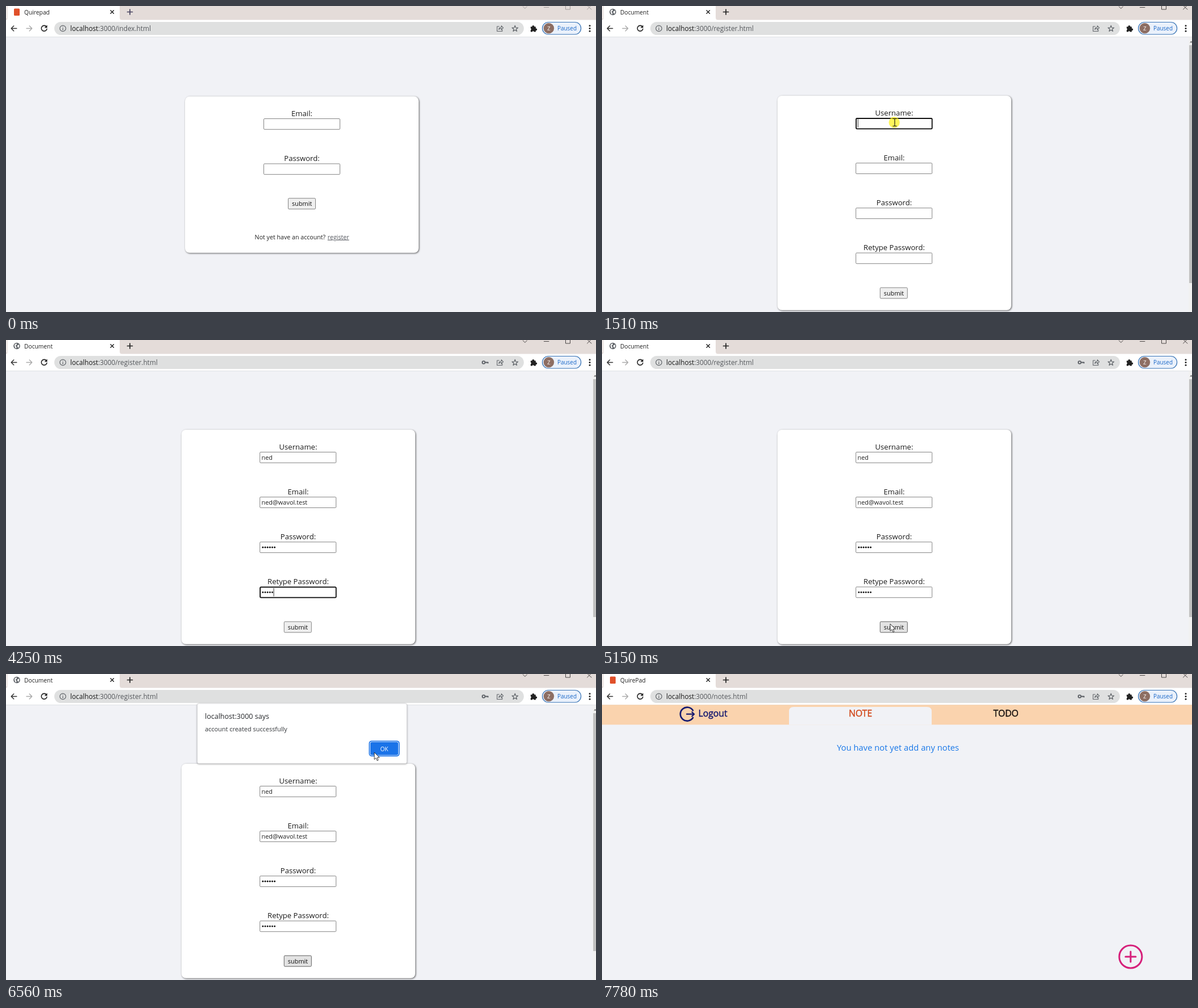
An HTML page that plays this animation: 1038 px wide and 539 px high, repeating every 8.18 s.

```html
<!DOCTYPE html>
<html lang="en">
<head>
<meta charset="utf-8">
<title>Sign up</title>
<style>
html, body { margin: 0; width: 100%; height: 100%; overflow: hidden; background: #f1f2f6; }
svg { display: block; width: 1038px; height: 539px; }
text { font-family: "Open Sans", "Noto Sans", sans-serif; }
.card { fill: #fff; filter: drop-shadow(1.6px 1.6px 1.5px rgba(0, 0, 0, .62)); }
.dialog { fill: #fff; stroke: #c9cacd; stroke-width: .6; filter: drop-shadow(0 1px 1.5px rgba(0, 0, 0, .35)); }
.box { fill: #fff; stroke: #767676; stroke-width: .9; }
.line { fill: none; stroke-linecap: round; stroke-linejoin: round; }
</style>
</head>
<body>
<svg id="stage" viewBox="0 0 1038 539"></svg>
<script>
const LOOP = 8180;
const INK = '#222', NAVY = '#151a70', PINK = '#d6207a';

// Runs of picture changes: first time, last time, number of steps.
const RUNS = [
  [100, 900, 9], [1000, 1310, 4], [1510, 1710, 3], [2010, 2010, 1], [2310, 2310, 1],
  [2510, 2510, 1], [2930, 3430, 6], [3740, 3830, 2], [4050, 4050, 1], [4250, 4350, 2],
  [4550, 5150, 7], [5350, 5550, 3], [5760, 6560, 9], [6660, 7380, 8], [7480, 7780, 4]
];

// Pointer path: time, x, y, shape from that time on.
const PATH = [
  [0, 0, 0, ''], [100, 915, 508, 'arrow'], [400, 712, 446, 'arrow'], [700, 588, 409, 'hand'],
  [900, 585, 407, 'hand'], [1000, 571, 362, 'arrow'], [1310, 515, 205, 'beam'],
  [2930, 536.5, 447, 'beam'], [3830, 536.5, 447, ''], [4350, 536.5, 447, 'beam'],
  [4550, 535, 450, 'beam'], [4650, 527, 462, 'arrow'], [4950, 507, 500, 'arrow'],
  [5560, 507, 500, 'arrow'], [5960, 509, 466, 'arrow'], [6360, 652, 134, 'arrow'],
  [6560, 648, 138, 'arrow'], [6660, 631, 151, 'arrow'], [6960, 664, 215, 'arrow'],
  [7180, 737, 343, 'arrow'], [7280, 790, 388, 'arrow'], [7380, 859, 431, 'arrow'],
  [7680, 976, 525, 'arrow'], [7780, 976, 525, '']
];
const STILL = [1310, 5560];          // the pointer rests until the next key
const CLICKS = [[900, 1000], [1510, 1710], [2930, 3030], [4950, 5150]];
const DOTS = [3230, 3430, 3740, 4050, 4250, 4350];

const text = (x, y, size, str, fill = INK, more = '') =>
  `<text x="${x}" y="${y}" font-size="${size}" fill="${fill}" ${more}>${str}</text>`;
const mid = 'text-anchor="middle"';
const label = (x, y, str) => text(x, y, 13.12, str, '#1c1c1c', mid);
const line = (d, color, width = 1.5, more = '') =>
  `<path class="line" d="${d}" stroke="${color}" stroke-width="${width}" ${more}/>`;
const rect = (x, y, w, h, fill, r = 0, more = '') =>
  `<rect x="${x}" y="${y}" width="${w}" height="${h}" rx="${r}" fill="${fill}" ${more}/>`;
const field = (x, y) => rect(x + .5, y + .5, 134, 18.8, '#fff', 1.4, 'class="box"');
const button = (x, y, id) =>
  rect(x + .5, y + .5, 48, 19, '#efefef', 1.6, `id="${id}" stroke="#767676" stroke-width=".9"`) +
  text(x + 24.7, y + 14.1, 10.93, 'submit', '#111', mid);
const group = (id, body) => `<g id="${id}">${body}</g>`;
const bullets = (id, y) => group(id, [0, 1, 2, 3, 4, 5].map(i =>
  `<circle cx="${451.9 + 4.15 * i}" cy="${y}" r="1.45" fill="#111"/>`).join(''));

const star = Array.from({ length: 10 }, (_, i) => {
  const r = i % 2 ? 2.3 : 5.6, a = i * Math.PI / 5 - Math.PI / 2;
  return `${895.5 + r * Math.cos(a)},${40 + r * Math.sin(a)}`;
}).join(' ');

const tabs =
  rect(0, 0, 1038, 25, '#e4dcd9') + rect(0, 0, 2.4, 22, '#f4efed') +
  '<path d="M0 25Q3 24 3 20V0H200V20Q200 24.5 204 25Z" fill="#fff"/>' +
  group('square', rect(14, 4.5, 10, 12.5, '#e0502a', 1.5)) +
  group('globe', '<circle cx="19" cy="10.5" r="5.8" fill="#5f6368"/>' +
    '<path d="M15 8.500q2.500-2.800 4.200-2l-.8 2.500-2 1 2 2-.4 3q-3-1.200-3-6.500M20 9.500l3-1.500q1 3-1 6l-2-2Z" fill="#fff"/>') +
  text(32, 14.6, 10.25, '', INK, 'id="title"') +
  line('M183.900 7.700l5.600 5.600m0-5.600l-5.600 5.600', '#222', 1.4) +
  group('add', line('M213.500 10.500h9m-4.500-4.500v9', 'currentColor', 1.7)) +
  group('caption', line('M909.500 1l3.500 3.500 3.500-3.500M946.500 2.500h8.500M984.500-1V6H992.500V-1M1022.500 6L1026 2.500l4 3.500M1022.500-1l3.500 3.500 4-4', 'currentColor', 1));

const bar =
  rect(0, 24.5, 1038, 29.700, '#fff') + rect(0, 54, 1038, .8, '#dadce0') +
  line('M18.800 39.500H9.500M13.700 35l-4.500 4.500 4.500 4.500', '#333', 1.5) +
  line('M36 39.500h9.300M41.200 35l4.500 4.500-4.500 4.500', '#aaa', 1.4) +
  line('M71 36.300A4.900 4.900 0 1 0 71.900 40.500', '#222', 1.600) +
  '<path d="M72.500 33.500v5h-5Z" fill="#222"/>' +
  rect(85, 28, 826, 23, '#dfe0e0', 11.5) +
  '<circle cx="100" cy="39.5" r="5.200" fill="none" stroke="#5f6368" stroke-width="1.200"/>' +
  line('M100 39.300v2.800M100 37v.1', '#5f6368', 1.3) +
  text(113, 43.7, 11.75, 'localhost<tspan fill="#55585c">:3000/<tspan id="page"></tspan></tspan>', '#161616') +
  group('key', '<circle cx="840.300" cy="39.500" r="2.400" fill="none" stroke="#5f6368" stroke-width="1.800"/>' +
    line('M843 39.500h5v1.800m-2-1.600v1', '#5f6368', 1.8, 'style="stroke-linecap:butt"')) +
  line('M867.500 36h-3.500v8.500h9V42M867 41.500q.5-4 4.500-4.200v-2.500l3.300 3.500-3.300 3.500v-2.300q-3-.2-4.500 2Z', '#5f6368', 1.1) +
  `<polygon points="${star}" fill="none" stroke="#5f6368" stroke-width="1.200" stroke-linejoin="round"/>` +
  '<path d="M923 36.500h2.700a1.900 1.900 0 1 1 3.700 0h2.600v3a1.900 1.900 0 1 1 0 3.700v2.300h-3a1.700 1.700 0 0 0-3.200 0H923v-3a1.800 1.800 0 0 0 0-3.300Z" fill="#222"/>' +
  rect(943.6, 28.500, 68, 21.500, '#eaf1fb', 10.800, 'stroke="#3672b5" stroke-width="1.200"') +
  '<circle cx="955" cy="39.300" r="9.200" fill="#8d6e63"/>' +
  text(955, 42.9, 9.6, 'Z', '#fff', mid) + text(970, 43.2, 9.95, 'Paused', '#1967c8') +
  [34.700, 39.500, 44.300].map(y => `<circle cx="1027" cy="${y}" r="1.500" fill="#222"/>`).join('');

const login =
  rect(315, 159.300, 411, 275.5, '#fff', 8, 'class="card"') +
  label(520.5, 194.2, 'Email:') + field(453, 198) +
  label(520.5, 273.4, 'Password:') + field(453, 277.4) +
  button(496, 338.2, 'enter') +
  text(437.6, 410.7, 10.66, 'Not yet have an account?') +
  text(565.800, 410.7, 10.66, 'register', '#55585f', 'text-decoration="underline"');

const names = ['Username:', 'Email:', 'Password:', 'Retype Password:'];
const register =
  rect(308.700, 158, 411.300, 377.800, '#fff', 8, 'class="card"') +
  names.map((n, i) => label(514, 192.800 + 79.200 * i, n) + field(446.2, 197 + 79.15 * i)).join('') +
  button(488.8, 495.6, 'send') +
  rect(447.2, 0, 133.5, 18.300, 'none', 1.6, 'id="ring" stroke="#101010" stroke-width="1.800"') +
  text(449.5, 210.7, 10.93, '', INK, 'id="user"') +
  group('filled', text(449.5, 289.900, 10.93, 'ned@wavol.test') + bullets('pass', 365.2)) +
  bullets('again', 444.4) +
  rect(0, 0, .9, 14.5, '#222', 0, 'id="caret"') +
  rect(1032, 54.800, 6, 485, '#f1f1f1') + rect(1033, 69, 5, 419, '#c1c1c1') +
  '<path d="M1034 64.500l2.500-3 2.500 3Z" fill="#777"/>';

const bold = (color, more = '') => `stroke="${color}" stroke-width=".45" ${more}`;
const notes =
  rect(0, 54.3, 1038, 35, '#fad3ae') +
  '<path d="M329 89.500V66q0-8 8-8H572q8 0 8 8V89.500Z" fill="#f1f2f6"/>' +
  line('M160 64.200A12 12 0 1 0 160 77', NAVY, 2.7) +
  line('M149 70.700h13M158.300 67l3.900 3.700-3.900 3.700', NAVY, 2.2) +
  text(169.500, 75.3, 15.74, 'Logout', NAVY, bold(NAVY)) +
  text(454.7, 75.3, 15.74, 'NOTE', '#d1491c', bold('#d1491c', mid)) +
  text(710.700, 75.3, 15.74, 'TODO', '#15100f', bold('#15100f', mid)) +
  text(520.700, 135, 14.76, 'You have not yet add any notes', '#1877e8', mid + ' id="empty"') +
  `<circle cx="930" cy="498" r="20" fill="none" stroke="${PINK}" stroke-width="3"/>` +
  line('M921 498h18M930 489v18', PINK, 3);

const dialog =
  rect(336.500, 52, 368.700, 105.700, '#fff', 3, 'class="dialog"') +
  text(350, 78.7, 12.54, 'localhost:3000 says', '#26282b') +
  text(350, 101, 10.94, 'account created successfully', '#33363a') +
  group('focus', rect(639.3, 118.3, 52.4, 26, '#fff', 4, 'stroke="#1a73e8" stroke-width="1.700"')) +
  rect(641, 120, 49, 22.700, '#1a73e8', 2.5, 'id="ok"') +
  text(665.5, 135.7, 10.1, 'OK', '#fff', mid);

const pointer =
  '<circle id="glow" r="9.700" cx="-.8" fill="#fdf21c" opacity=".72"/>' +
  group('arrow', '<path d="M0 0V12.500L2.900 9.900 5 14.600 7 13.700 5 9.200H9Z" fill="#fff" stroke="#222" stroke-width=".9" stroke-linejoin="round"/>') +
  group('beam', line('M-3.200-6.500h2.400q.8 0 .8 1 0-1 .8-1h2.400M0-5.500V5.500M-3.200 6.500h2.400q.8 0 .8-1 0 1 .8 1h2.400', '#111', 1.1)) +
  group('hand', '<path d="M-1 1Q0-1 1.200 1V6l4 .8q3 .6 3 3L7 15H1L-4 9q0-2 3 0Z" fill="#fff" stroke="#222" stroke-width=".9" stroke-linejoin="round"/>');

document.getElementById('stage').innerHTML =
  rect(0, 0, 1038, 539, '#f1f2f6') + tabs + bar +
  group('login', login) + group('register', register) + group('notes', notes) +
  group('dialog', dialog) + group('pointer', pointer);

const $ = id => document.getElementById(id);
const show = (id, on) => { $(id).style.display = on ? '' : 'none'; };
const set = (id, attrs) => { for (const k in attrs) $(id).setAttribute(k, attrs[k]); };
const within = (t, a, b) => t >= a && t < b;

function snap(t) {
  let last = 0;
  for (const [a, b, n] of RUNS) {
    if (t < a) break;
    const step = n > 1 ? (b - a) / (n - 1) : 1;
    last = a + Math.min(n - 1, Math.floor((t - a + 3) / step)) * step;
  }
  return last;
}

function pointerAt(t) {
  let i = PATH.length - 1;
  while (PATH[i][0] > t + 5) i--;
  const [a, x, y, kind] = PATH[i], next = PATH[i + 1];
  if (!next || STILL.includes(a)) return { x, y, kind };
  const k = Math.max(0, (t - a) / (next[0] - a));
  return { x: x + (next[1] - x) * k, y: y + (next[2] - y) * k, kind };
}

function drawForm(t) {
  const typed = DOTS.filter(d => t >= d - 5).length;
  const first = t < 2925, focused = within(t, 1505, 5045);
  $('user').textContent = 'ned'.slice(0, t < 2305 ? 0 : t < 2505 ? 2 : 3);
  show('filled', !first);
  [...$('again').children].forEach((dot, i) => { dot.style.display = i < typed ? '' : 'none'; });
  show('ring', focused);
  show('caret', focused && !within(t, 2005, 2305));
  set('ring', { y: first ? 198 : 435.4 });
  const x = first ? 449.900 + (t < 2305 ? 0 : t < 2505 ? 13 : 19.7) : 449.900 + 4.15 * typed;
  set('caret', { x, y: first ? 199.3 : 437 });
  set('send', { fill: t >= 4845 ? '#e3e3e3' : '#efefef', stroke: t >= 4845 ? '#4f4f4f' : '#767676' });
}

function drawDialog(t) {
  const leaving = t >= 6655;
  const alpha = t < 5345 ? 0 : t < 5445 ? .35 : t < 5545 ? .8 : !leaving ? 1 : t < 6755 ? .5 : t < 6855 ? .12 : 0;
  const lift = leaving ? (t < 6755 ? -9.6 : -13) : t < 5445 ? -3 : t < 5545 ? -1 : 0;
  show('dialog', alpha);
  set('dialog', { opacity: alpha, transform: `translate(0 ${lift})` });
  show('focus', !leaving);
  set('ok', leaving ? { x: 640, y: 118.5, width: 53, height: 26.3 } : { x: 641, y: 120, width: 49, height: 22.7 });
}

function draw(now) {
  const t = snap(now % LOOP);
  const page = t < 995 ? 'index' : t < 6655 ? 'register' : 'notes';
  show('login', page === 'index');
  show('register', page === 'register');
  show('notes', page === 'notes');
  show('square', page !== 'register');
  show('globe', page === 'register');
  show('key', t >= 2925);
  show('empty', t >= 6855);
  $('title').textContent = { index: 'Quirepad', register: 'Document', notes: 'QuirePad' }[page];
  $('page').textContent = page + '.html';
  $('caption').style.color = t < 100 ? '#a29c9b' : '#4a4645';
  $('add').style.color = t < 100 ? '#45415f' : '#222';
  drawForm(t);
  drawDialog(t);
  const p = pointerAt(t);
  set('pointer', { transform: `translate(${p.x} ${p.y})` });
  ['arrow', 'beam', 'hand'].forEach(k => show(k, p.kind === k));
  show('glow', CLICKS.some(([a, b]) => within(t, a - 5, b - 5)));
  set('glow', { opacity: within(t, 1605, 1705) ? .35 : .72 });
}

function tick() {
  draw(performance.now());
  requestAnimationFrame(tick);
}
tick();
</script>
</body>
</html>
```
